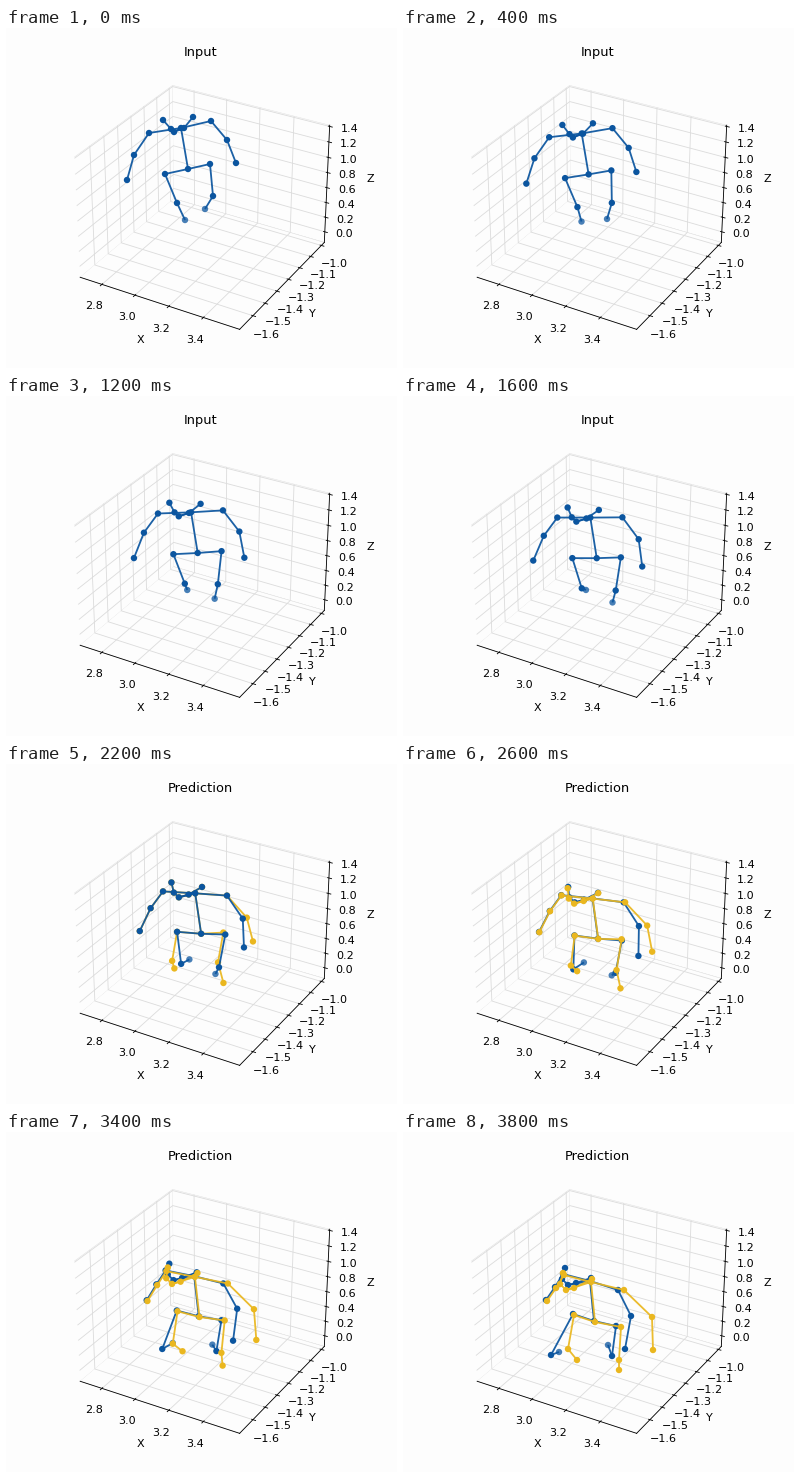
A matplotlib script that plays this animation: 391 px wide and 340 px high, repeating every 4 s.

```python
import numpy as np
import matplotlib.pyplot as plt
from matplotlib.animation import FuncAnimation
from matplotlib.collections import LineCollection

W, H, DPI = 391, 340, 76.8
FRAMES, STEP_MS, SWITCH = 20, 200, 10
BG, GRID = "#fdfdfd", "#dcdcdc"
BLUE, GOLD = "#0b559f", "#eab71f"

plt.rcParams.update({"font.family": "DejaVu Sans", "font.size": 10.4,
                     "grid.color": GRID})

# First and last place of each joint on screen: x0, y0, x1, y1
JOINTS = {
    "r_ear": (157, 92, 162, 136),
    "r_eye": (165, 101, 159, 147),
    "nose": (168, 104, 165, 153),
    "l_eye": (178, 100, 173, 151),
    "l_ear": (187, 89, 188, 146),
    "neck": (175, 100, 187, 149),
    "r_shoulder": (143, 105, 160, 142),
    "r_elbow": (128, 127, 152, 155),
    "r_wrist": (121, 152, 143, 168),
    "l_shoulder": (205, 93, 215, 158),
    "l_elbow": (221, 112, 228, 184),
    "l_wrist": (230, 135, 222, 217),
    "pelvis": (182, 141, 191, 189),
    "r_hip": (159, 146, 170, 182),
    "r_knee": (171, 175, 148, 223),
    "r_ankle": (179, 192, 156, 220),
    "l_hip": (204, 136, 213, 194),
    "l_knee": (207, 168, 209, 224),
    "l_ankle": (199, 181, 205, 213),
}

# Limbs that swing on their own: dx, dy and lateness of the swing
SWING = {
    "r_wrist": (0, 6, 1),
    "r_knee": (18, -3, 1),
    "r_ankle": (18, -13, 1.5),
    "l_knee": (5, 3, 1),
    "l_ankle": (8, 12, 0.75),
}

# How the prediction strays from the body, from its start to its end
STRAY = {
    "l_shoulder": (0, 0, 6, 0),
    "l_elbow": (4, -1, 21, 1),
    "l_wrist": (9, -6, 28, 1),
    "r_knee": (-9, -3, 17, -6),
    "r_ankle": (-15, 9, 18, 8),
    "l_hip": (-2, -2, 5, 1),
    "l_knee": (-1, -5, 7, 4),
    "l_ankle": (8, 9, 11, 25),
}
STRAY.update(dict.fromkeys(["r_ear", "r_eye", "nose", "l_eye"], (0, 0, -2, 5)))

CHAINS = (
    "r_ear r_eye nose l_eye l_ear",
    "nose neck pelvis",
    "r_wrist r_elbow r_shoulder neck l_shoulder l_elbow l_wrist",
    "r_ankle r_knee r_hip pelvis l_hip l_knee l_ankle",
)
NAMES = list(JOINTS)
BONES = [(NAMES.index(a), NAMES.index(b))
         for chain in map(str.split, CHAINS)
         for a, b in zip(chain, chain[1:])]


def split_ends(rows):
    ends = np.array(rows, float)
    return ends[:, :2], ends[:, 2:]


def turn(x):
    """Default swing: the body leans right, its left side most."""
    return 7.5 + 0.1 * (x - 175), 1, 1


START, END = split_ends([JOINTS[n] for n in NAMES])
STRAY_START, STRAY_END = split_ends([STRAY.get(n, (0, 0, 1, 1)) for n in NAMES])
BEND = np.array([SWING.get(n, turn(JOINTS[n][0])) for n in NAMES], float)


def pose_at(i):
    u = i / (FRAMES - 1)
    bump = np.sin(np.pi * u ** BEND[:, 2:])
    return START + (END - START) * u + BEND[:, :2] * bump


def guess_at(i):
    v = (i - SWITCH - 1) / (FRAMES - SWITCH - 2)
    return pose_at(i) + STRAY_START + (STRAY_END - STRAY_START) * v


class Skeleton:
    def __init__(self, ax, color, far_alpha=1.0):
        self.lines = LineCollection([], colors=color, linewidths=1.7, alpha=0.93)
        ax.add_collection(self.lines)
        self.dots = ax.scatter(*START.T, s=36, c=color, linewidths=0)
        self.dots.set_alpha([far_alpha if "ankle" in n else 1 for n in NAMES])

    def show(self, pts, layer):
        self.lines.set_segments([pts[[a, b]] for a, b in BONES])
        self.dots.set_offsets(pts)
        self.lines.set_zorder(layer)
        self.dots.set_zorder(layer + 0.5)

    def set_visible(self, on):
        self.lines.set_visible(on)
        self.dots.set_visible(on)


fig = plt.figure(figsize=((W + 1e-6) / DPI, (H + 1e-6) / DPI), dpi=DPI,
                 facecolor=BG)

# Empty 3D box with its scales
side = 283.85
box = fig.add_axes([52.74 / W, 20.74 / H, side / W, side / H],
                   projection="3d", facecolor=BG)
box.set_xticks(np.linspace(2.8, 3.4, 4))
box.set_yticks(np.linspace(-1.6, -1.0, 7))
box.set_zticks(np.linspace(0, 1.4, 8))
box.set(xlim=(2.666, 3.605), ylim=(-1.707, -0.972), zlim=(-0.147, 1.4155),
        xlabel="X", ylabel="Y", zlabel="Z")
for axis in (box.xaxis, box.yaxis, box.zaxis):
    axis.pane.set(facecolor=BG, edgecolor=GRID, alpha=1, linewidth=0.4)

title = fig.text(194.6 / W, 1 - 27.8 / H, "Input", size=12.2,
                 ha="center", va="baseline")

# Flat layer in pixel units for the figures
stage = fig.add_axes([0, 0, 1, 1], zorder=5)
stage.axis("off")
body = Skeleton(stage, BLUE, far_alpha=0.75)
guess = Skeleton(stage, GOLD)
stage.set(xlim=(0, W), ylim=(H, 0))


def update(i):
    predicting = i >= SWITCH
    title.set_text("Prediction" if predicting else "Input")
    body.show(pose_at(i), 2)
    guess.set_visible(predicting)
    if predicting:
        guess.show(guess_at(i), 1 if i < 13 else 3)
    return []


anim = FuncAnimation(fig, update, frames=FRAMES, interval=STEP_MS,
                     init_func=lambda: update(0), repeat=True,
                     repeat_delay=0, blit=False)
plt.show()
```
